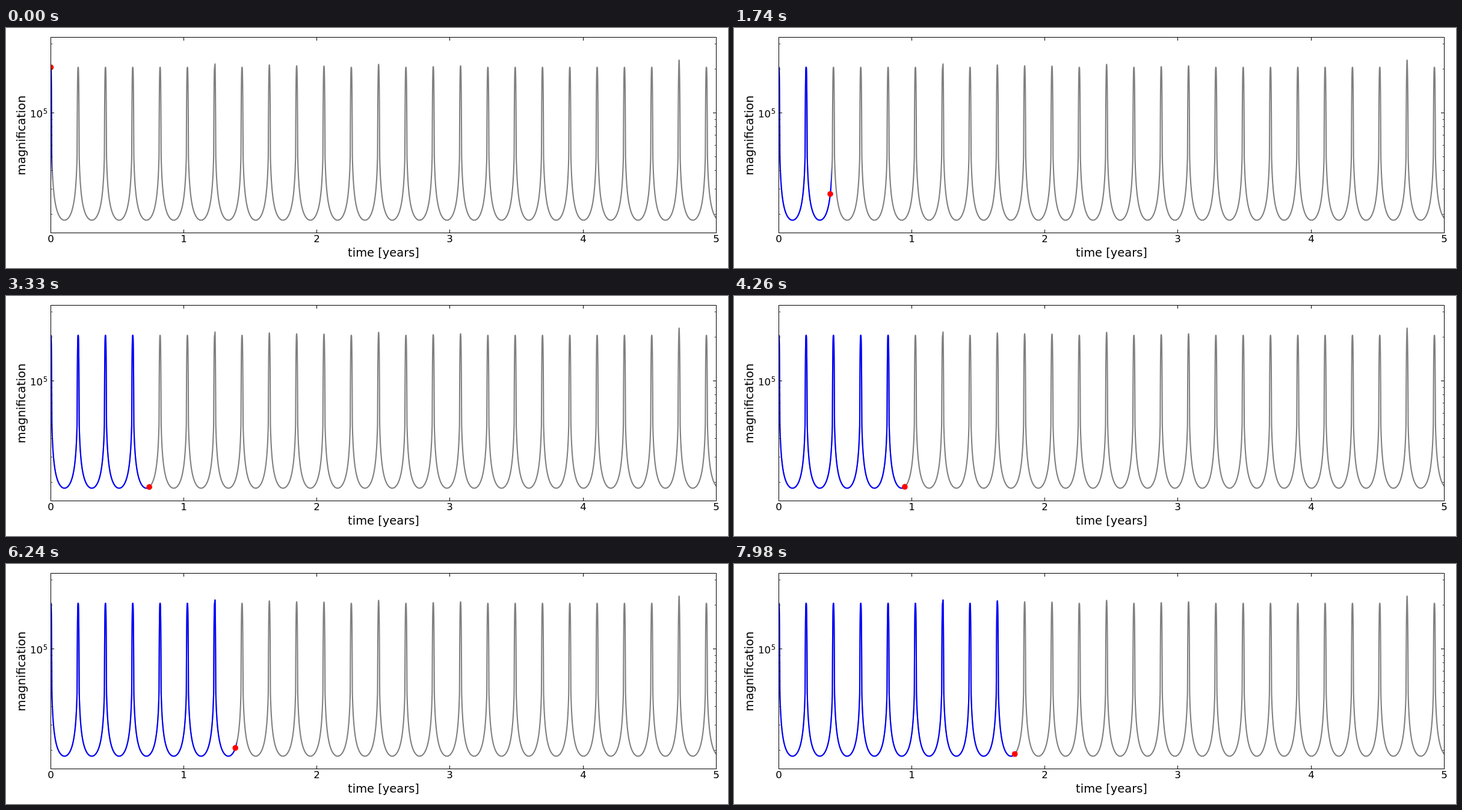
Animation of 1200x400 px, one loop 8000 ms. Source, as an HTML page with a canvas:

```html
<!DOCTYPE html>
<html>
<head>
<meta charset="utf-8">
<style>
html, body { margin: 0; overflow: hidden; background: #fff; }
canvas { display: block; }
</style>
</head>
<body>
<canvas id="stage" width="1200" height="400"></canvas>
<script>
const ctx = document.getElementById('stage').getContext('2d');
const LEFT = 74.5, RIGHT = 1180.5, TOP = 15.5, BOTTOM = 341.5;
const PERIOD = 45.4, STEP = 1106 / 750, FRAME = 30, LOOP = 8000;
const KNEE = 1.75;

// Extra height of the irregular peaks, by index
const lift = { 6: 11, 8: 4, 9: 2.5, 10: 2, 12: 5, 14: 1, 15: 2.5, 23: 12 };

function curveY(x) {
  const k = Math.round((x - LEFT) / PERIOD);
  const d = x - LEFT - k * PERIOD;
  const a = Math.abs(d);
  if (a < KNEE) {
    const shift = k === 6 ? 0.7 : 0;
    const spike = (lift[k] || 0) * Math.exp(-((d - shift) ** 2) / 0.2);
    return 65.5 + 148 * (a / KNEE) ** 3 - spike;
  }
  const l = -Math.log10(Math.sin(Math.PI * a / PERIOD));
  return 320.3 - 79.5 * l - 40 * l * l;
}

const curve = new Path2D();
for (let x = LEFT; x <= RIGHT; x += 0.1) curve.lineTo(x, curveY(x));

function clipTo(right, draw) {
  ctx.save();
  ctx.beginPath();
  ctx.rect(LEFT, TOP, right - LEFT, BOTTOM - TOP);
  ctx.clip();
  draw();
  ctx.restore();
}

function strokeCurve(color) {
  ctx.strokeStyle = color;
  ctx.lineWidth = 2.08;
  ctx.lineJoin = 'round';
  ctx.stroke(curve);
}

function line(x1, y1, x2, y2) {
  ctx.beginPath();
  ctx.moveTo(x1, y1);
  ctx.lineTo(x2, y2);
  ctx.stroke();
}

function text(s, x, y, size, align = 'center') {
  ctx.font = `${size}px "DejaVu Sans", sans-serif`;
  ctx.textAlign = align;
  ctx.fillText(s, x, y);
}

function yTick(value, length) {
  const y = Math.round(141 - 242 * Math.log10(value / 1e5)) + 0.5;
  line(LEFT, y, LEFT + length, y);
  line(RIGHT, y, RIGHT - length, y);
}

function drawAxes() {
  ctx.strokeStyle = ctx.fillStyle = '#000';
  ctx.lineWidth = 1;
  ctx.strokeRect(LEFT, TOP, RIGHT - LEFT, BOTTOM - TOP);
  for (let year = 0; year <= 5; year++) {
    const x = Math.floor(74.3 + 221.2 * year) + 0.5;
    line(x, BOTTOM, x, BOTTOM - 5.5);
    line(x, TOP, x, TOP + 5.5);
    text(year, x, 357, 16.67);
  }
  ctx.lineWidth = 0.7;
  for (let i = 2; i <= 9; i++) yTick(i * 1e4, 2.8);
  yTick(2e5, 2.8);
  yTick(3e5, 2.8);
  ctx.lineWidth = 1;
  yTick(1e5, 5.5);
  text('10', 40, 149, 16.67, 'left');
  text('5', 61.7, 142.8, 11.67, 'left');
  text('time [years]', 627.5, 381, 19.44);
  ctx.save();
  ctx.translate(32, 179);
  ctx.rotate(-Math.PI / 2);
  text('magnification', 0, 0, 19.44);
  ctx.restore();
}

function render(now) {
  const n = Math.floor((now % LOOP) / FRAME);
  const x = LEFT + n * STEP;
  ctx.fillStyle = '#fff';
  ctx.fillRect(0, 0, 1200, 400);
  clipTo(RIGHT, () => strokeCurve('#808080'));
  clipTo(x + STEP + 0.6, () => strokeCurve('#00f'));
  clipTo(RIGHT, () => {
    ctx.fillStyle = '#f00';
    ctx.beginPath();
    ctx.arc(x, curveY(x), 4.8, 0, 2 * Math.PI);
    ctx.fill();
  });
  drawAxes();
}

const start = performance.now();
function tick() {
  render(performance.now() - start);
  requestAnimationFrame(tick);
}
tick();
</script>
</body>
</html>
```
